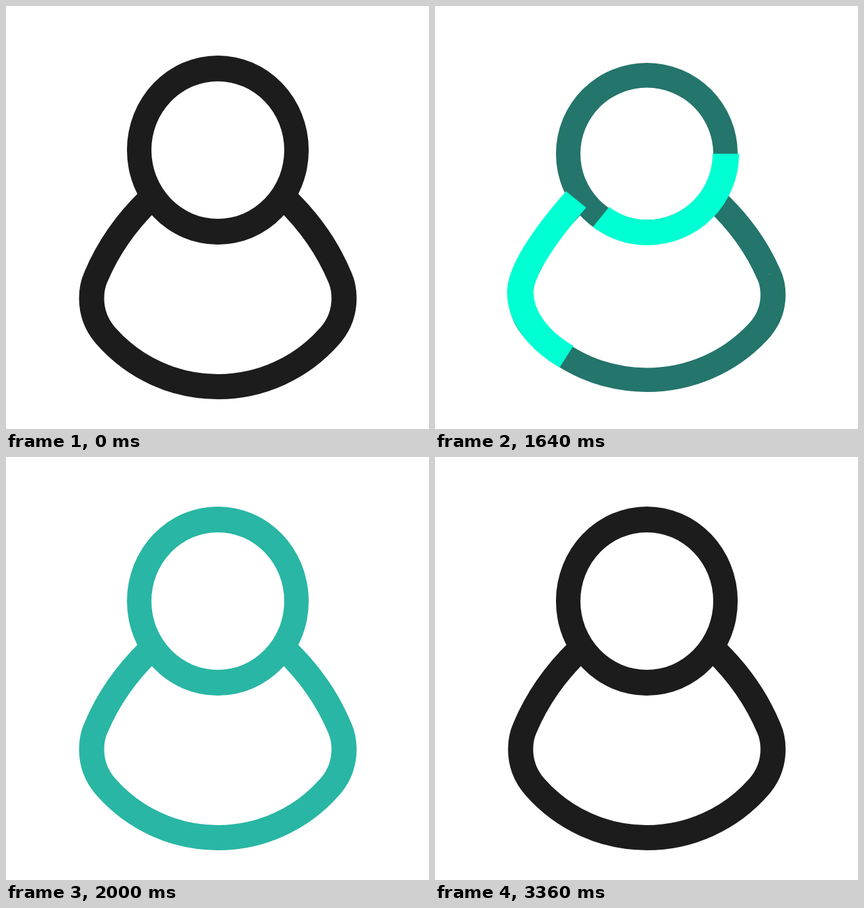
Recreate the animation shown at these times as an HTML page. Size 640 by 640 pixels, loop 5.5 s.

```html
<!DOCTYPE html>
<html lang="en">
<head>
<meta charset="utf-8">
<title>Avatar icon</title>
<style>
  html, body { margin: 0; width: 100%; height: 100%; overflow: hidden; background: #fff; }
  svg { display: block; width: 100%; height: 100%; }
  .trace { fill: none; stroke: #00ffd2; stroke-width: 40; }
</style>
</head>
<body>
<svg viewBox="0 0 640 640">
  <g id="icon">
    <g class="body">
      <path fill="none" stroke="currentColor" stroke-width="38"
        d="M424 293C459 327 487 367 505 410C509.500 420 511.500 431 511.500 442
           C511.500 464 504 483 490 499C447 548 385.500 576 320.500 576
           C255.500 576 194 548 151 499C137 483 129.500 464 129.500 442
           C129.500 431 131.500 420 136 410C154 367 182 327 217 293"/>
    </g>
    <g class="head">
      <path fill="currentColor" fill-rule="evenodd"
        d="M183 218a137.500 143 0 1 1 275 0a137.500 143 0 1 1 -275 0z
           M220 218a100.500 104 0 1 0 201 0a100.500 104 0 1 0 -201 0z"/>
    </g>
  </g>
  <g id="traces">
    <g class="body">
      <path class="trace" pathLength="1"
        d="M213.500 292C168 346 129 404 129 438C129 507 218 574 327 574
           C395 574 463 536 499 489C507 477 512 457 512 438C512 404 473 346 427.500 292"/>
    </g>
    <g class="head">
      <ellipse class="trace" pathLength="1" cx="321.800" cy="218" rx="118.200" ry="124"/>
    </g>
  </g>
</svg>
<script>
const LOOP = 5500, FPS = 14;
const DARK = [28, 28, 28], TEAL = [41, 182, 164];
const HEAD_PIVOT = 361, BODY_PIVOT = 309;

const all = selector => document.querySelectorAll(selector);
const icon = document.getElementById('icon');
const traces = document.getElementById('traces');

const mix = (a, b, k) => a + (b - a) * k;

// Smooth 0 to 1 between two times in seconds
function ease(t, from, to) {
  const x = Math.min(1, Math.max(0, (t - from) / (to - from)));
  return x * x * (3 - 2 * x);
}

// Squash, stretch, settle
function stretch(t) {
  return 1 - 0.052 * ease(t, 1.38, 1.59)
           + 0.084 * ease(t, 1.59, 1.8)
           - 0.032 * ease(t, 1.8, 2);
}

function scaleFrom(selector, pivot, s) {
  for (const el of all(selector))
    el.setAttribute('transform', `translate(0 ${pivot * (1 - s)}) scale(1 ${s})`);
}

function draw(ms) {
  // Motion advances in 14 steps per second; 5 ms absorbs rounded step times
  const step = Math.floor((ms % LOOP + 5) * FPS / 1000);
  const t = step / FPS;

  const s = stretch(t);
  scaleFrom('.head', HEAD_PIVOT, s);
  scaleFrom('.body', BODY_PIVOT, s);

  const tint = ease(t, 1.4, 1.84) - ease(t, 3.17, 3.35);
  icon.style.color = `rgb(${DARK.map((c, i) => Math.round(mix(c, TEAL[i], tint)))})`;

  traces.style.display = step >= 20 && step < 28 ? '' : 'none';
  const drawn = Math.max(0.0125, ease(t, 1.426, 1.97));
  for (const el of all('.trace')) el.setAttribute('stroke-dasharray', `${drawn} 2`);
}

const start = performance.now();
function tick() {
  draw(performance.now() - start);
  requestAnimationFrame(tick);
}
tick();
</script>
</body>
</html>
```
